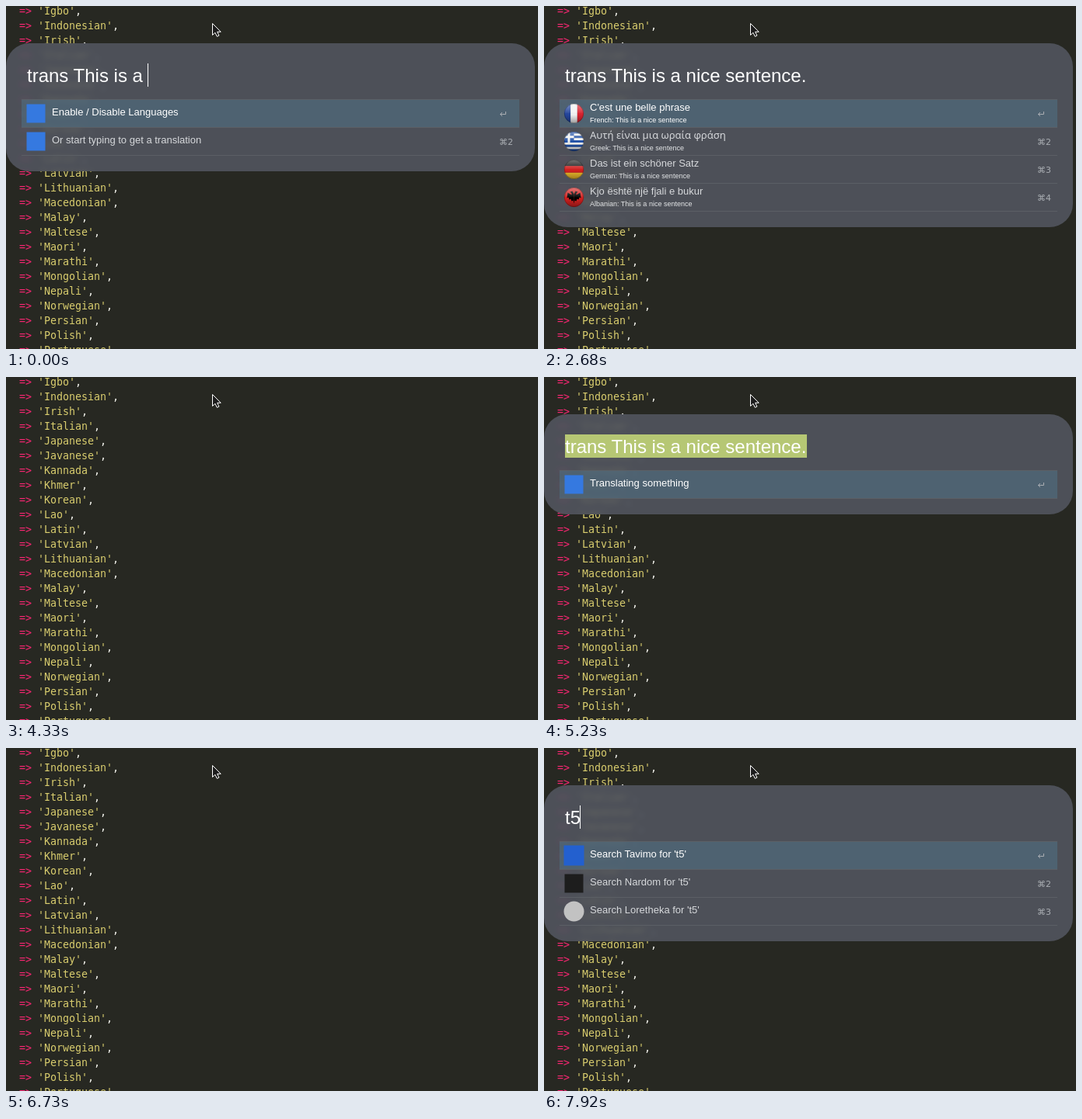
Write an HTML page that moves like this. It is 684 px wide and 442 px high and loops after 8000 ms.

```html
<!DOCTYPE html>
<html lang="en">
<head>
<meta charset="utf-8">
<title>Launcher translation</title>
<style>
html, body { margin: 0; width: 100%; height: 100%; overflow: hidden; background: #272822; }
svg { display: block; }
text { font-family: "Liberation Sans", Arial, sans-serif; white-space: pre; fill: #d6d8db; }
#code text { font: 13.3px "DejaVu Sans Mono", monospace; fill: #f8f8f2; }
#code .arrow { fill: #f92672; }
#code .string { fill: #d9cd6e; }
.query { font-size: 24px; fill: #fff; }
.title { font-size: 13px; }
.greek { font-family: "Noto Sans", sans-serif; }
.sub { font-size: 9px; fill: #e4e6e8; }
.key { font: 11px "DejaVu Sans", sans-serif; fill: #a9adb2; }
.selected .title, .selected .sub { fill: #fff; }
</style>
</head>
<body>
<svg width="684" height="442" viewBox="0 0 684 442">
  <defs>
    <filter id="blur" x="-20%" y="-5%" width="140%" height="110%"><feGaussianBlur stdDeviation="3.5"/></filter>
    <clipPath id="shape"><rect id="frame" y="48" width="680" height="82" rx="30"/></clipPath>
    <clipPath id="disc"><circle r="12.5"/></clipPath>
    <linearGradient id="gloss" x2="0" y2="1">
      <stop offset="0" stop-color="#fff" stop-opacity=".4"/>
      <stop offset=".45" stop-color="#fff" stop-opacity=".08"/>
      <stop offset=".55" stop-color="#000" stop-opacity="0"/>
      <stop offset="1" stop-color="#000" stop-opacity=".35"/>
    </linearGradient>
  </defs>
  <rect width="684" height="442" fill="#272822"/>
  <g id="code"></g>
  <g id="panel">
    <g clip-path="url(#shape)">
      <rect y="48" width="680" height="400" fill="#272822"/>
      <use href="#code" filter="url(#blur)"/>
      <rect y="48" width="680" height="400" fill="#545762" fill-opacity=".85"/>
    </g>
    <g id="content"></g>
  </g>
  <path d="M265.5 22.5v15l3.4-3.2 2.4 5 2.6-1.2-2.3-4.8h4.6z" fill="#1c1c1c" stroke="#fff"/>
</svg>
<script>
const el = id => document.getElementById(id);
const rect = (x, y, w, h, fill) =>
  `<rect x="${x}" y="${y}" width="${w}" height="${h}" fill="${fill}"/>`;
const text = (x, y, cls, str) => `<text x="${x}" y="${y}" class="${cls}">${str}</text>`;

const languages = `Igbo Indonesian Irish Italian Japanese Javanese Kannada Khmer Korean Lao Latin
  Latvian Lithuanian Macedonian Malay Maltese Maori Marathi Mongolian Nepali Norwegian Persian
  Polish Portuguese`.split(/\s+/);
el("code").innerHTML = languages.map((name, i) =>
  `<text x="17" y="${11 + 19 * i}"><tspan class="arrow">=&gt;</tspan> <tspan class="string">'${name}'</tspan>,</text>`
).join("");

// Icons are drawn around their own centre.
const flag = art => `<g clip-path="url(#disc)">${art}</g>
  <circle r="12.5" fill="url(#gloss)"/><circle r="12.2" fill="none" stroke="#000" stroke-opacity=".35" stroke-width=".7"/>`;
const bands = (colors, vertical) => {
  const size = 26 / colors.length;
  return colors.map((c, i) => vertical
    ? rect(-13 + i * size, -13, size, 26, c)
    : rect(-13, -13 + i * size, 26, size, c)).join("");
};
const blue = "#1f4fa8", white = "#f2f2f2";
const eagle = "M0-4L-2-8-5-7-3-5-3-3-8-6-9 1-7 0-6 3-4 2-3 5-1 4 0 8";
const icons = {
  French: flag(bands(["#24459c", white, "#d8232f"], true)),
  Greek: flag(bands([blue, white, blue, white, blue, white, blue, white, blue]) +
    rect(-13, -13, 13, 14.4, blue) + rect(-13, -7.3, 13, 3, white) + rect(-8, -13, 3, 14.4, white)),
  German: flag(bands(["#1a1a1a", "#d3201f", "#f0bd2c"])),
  Albanian: flag(rect(-13, -13, 26, 26, "#d2201f") +
    `<path d="${eagle}z"/><path d="${eagle}z" transform="scale(-1 1)"/>`),
  translate: rect(-12, -12, 24, 24, "#3579e0"),
  web: rect(-13, -13, 26, 26, "#2360cf"),
  shop: rect(-12, -12, 24, 24, "#1d1d1d"),
  wiki: `<circle r="13" fill="#c2c2c2"/>`
};

const results = (phrase, ...titles) => Object.keys(icons).slice(0, 4).map((lang, i) =>
  ({ icon: lang, title: titles[i], sub: `${lang}: ${phrase}` }));
const sentence = "This is a nice sentence";
const menu = [
  { icon: "translate", title: "Enable / Disable Languages" },
  { icon: "translate", title: "Or start typing to get a translation" }
];
const first = results("This is a n",
  "Ceci est un n", "Αυτό είναι ένα n", "Dies ist ein n", "Kjo është një n");
const second = results("This is a nice",
  "Ceci est une belle", "Αυτό είναι ένα ωραίο", "Dies ist ein schöner", "Kjo është një e bukur");
const third = results("This is a nice sent",
  "Ceci est un bel sent", "Αυτό είναι μια ωραία", "Das ist ein schöner sent", "Kjo është një sent bukur");
const fourth = results(sentence,
  "C'est une belle phrase", "Αυτή είναι μια ωραία φράση", "Das ist ein schöner Satz", "Kjo është një fjali e bukur");
const final = results(sentence + ".",
  "C'est une belle phrase .", "Αυτή είναι μια ωραία πρόταση.", "Das ist ein schöner Satz .", "Kjo është një fjali e bukur .");
const busy = [{ icon: "translate", title: "Translating something" }];
const blank = Array.from({ length: 9 }, () => ({}));
const search = [["web", "Tavimo"], ["shop", "Nardom"], ["wiki", "Loretheka"]]
  .map(([icon, name]) => ({ icon, title: `Search ${name} for 't5'` }));

const full = `trans ${sentence}.`;
const typed = n => full.slice(0, n);

// time, query, rows, query look (caret, plain or marked), selected row
const steps = [
  [0, typed(16), menu, "caret", 0],
  [150, typed(17), menu, "caret", 0],
  [300, typed(18), first, "caret", 0],
  [450, typed(20), first, "caret", 0],
  [600, typed(21), first, "caret", 0],
  [900, typed(23), first, "caret", 0],
  [1050, typed(25), second, "caret", 0],
  [1190, typed(26), second, "caret", 0],
  [1340, typed(28), second, "caret", 0],
  [1490, typed(29), second, "caret", 0],
  [1780, typed(29), third, "caret", 0],
  [2080, full, third, "caret", 0],
  [2530, full, fourth, "caret", 0],
  [2680, full, fourth, "plain", 0],
  [3280, full, final, "caret", 0],
  [3880, full, final, "plain", 0],
  [4330, null],
  [4930, "", [], "caret", 0],
  [5230, full, busy, "marked", 0],
  [5830, full, final, "marked", 0],
  [5980, full, final, "marked", 1],
  [6730, null],
  [7470, "", [], "caret", 0],
  [7770, "t", blank, "caret", 0],
  [7920, "t5", search, "caret", 0]
];

const pen = document.createElement("canvas").getContext("2d");
pen.font = '24px "Liberation Sans", Arial, sans-serif';

function drawRow({ icon, title, sub }, i, selected) {
  const y = 121 + 36 * i;
  const greek = icon === "Greek" ? " greek" : "";
  return `<g class="${selected ? "selected" : ""}">` +
    (selected ? rect(20, y, 640, 35, "rgba(81,116,138,.5)") : "") +
    rect(20, y + 35, 640, 1, "#5b5f65") +
    (icon ? `<g transform="translate(38.5 ${y + 17.5})">${icons[icon]}</g>` : "") +
    (title ? text(59, y + (sub ? 14 : 20), "title" + greek, title) : "") +
    (sub ? text(59, y + 29, "sub", sub) : "") +
    (selected
      ? `<path d="M642.5 ${y + 15}v3.5h-7m2.5-2.5l-2.5 2.5 2.5 2.5" fill="none" stroke="#a9adb2"/>`
      : text(634, y + 22, "key", "⌘" + (i + 1))) +
    "</g>";
}

function draw([, query, rows, look, selected]) {
  el("panel").style.display = query === null ? "none" : "";
  if (query === null) return;
  el("frame").setAttribute("height", rows.length ? 93 + 36 * rows.length : 82);
  const width = pen.measureText(query).width;
  el("content").innerHTML =
    (look === "marked" ? rect(27, 74, Math.round(width), 30, "#b6c774") : "") +
    text(27, 98, "query", query) +
    (look === "caret" ? rect(Math.floor(27 + width * .9985), 74, 1, 30, "#fff") : "") +
    (rows.length ? rect(20, 120, 640, 1, "#5b5f65") : "") +
    rows.map((row, i) => drawRow(row, i, i === selected)).join("");
}

let shown;
function tick() {
  const time = performance.now() % 8000;
  const step = steps.findLast(s => s[0] <= time);
  if (step !== shown) draw(shown = step);
  requestAnimationFrame(tick);
}
tick();
</script>
</body>
</html>
```
